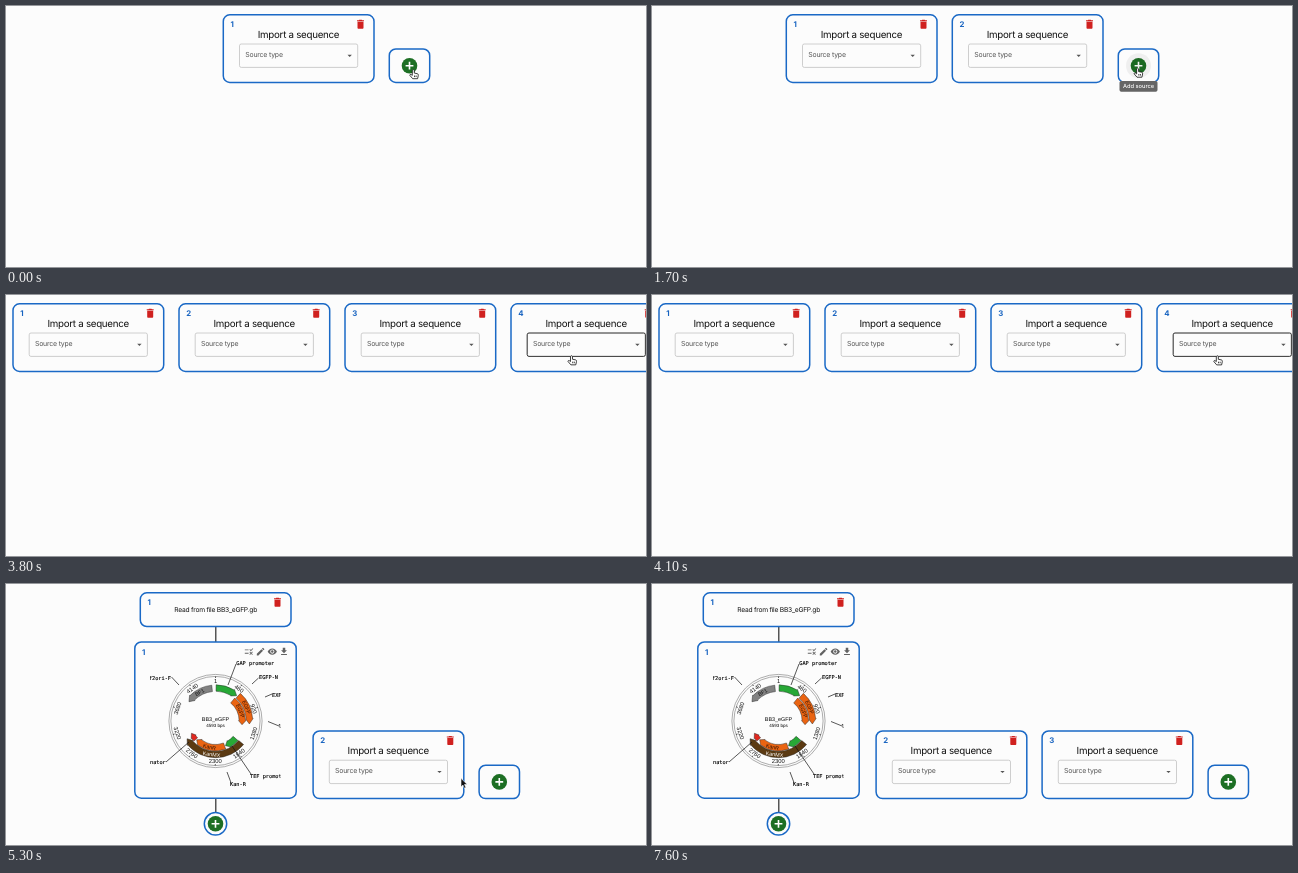
An HTML page for the animation above (8000 ms loop, 640x261 px).

```html
<!DOCTYPE html>
<html lang="en">
<head>
<meta charset="utf-8">
<title>Adding sources</title>
<style>
html, body { margin: 0; width: 100%; height: 100%; overflow: hidden; background: #fcfcfc; }
svg { display: block; width: 100%; height: 100%; }
text { font-family: "Liberation Sans", Arial, sans-serif; text-rendering: geometricPrecision; }
.box { fill: #fcfcfc; stroke: #1a69c6; stroke-width: 1.5; }
.num { font: bold 7.8px Inter, sans-serif; fill: #1763c0; }
.title { font: 9.75px Inter, sans-serif; letter-spacing: -.28px; fill: #111; text-anchor: middle; }
.field { fill: none; stroke: #c2c2c2; stroke-width: .8; }
.label { font: 6.95px Inter, sans-serif; letter-spacing: -.2px; fill: #555; }
.file { font: 6.7px Inter, sans-serif; letter-spacing: -.24px; fill: #111; text-anchor: middle; }
.mono { font: 5.25px "DejaVu Sans Mono", monospace; fill: #000; stroke: #000; stroke-width: .12; }
.mid { text-anchor: middle; }
.end { text-anchor: end; }
.name { font-size: 5.4px; text-anchor: middle; }
.size { font-size: 4.5px; text-anchor: middle; }
.link { stroke: #2b2b2b; stroke-width: 1.2; }
.lead { fill: none; stroke: #111; stroke-width: .7; }
.ring { fill: none; stroke: #8a8a8a; stroke-width: .7; }
.tip { font: 500 5.7px Inter, sans-serif; fill: #fff; text-anchor: middle; }
</style>
</head>
<body>
<svg id="stage" viewBox="0 0 640 261" preserveAspectRatio="none" xmlns="http://www.w3.org/2000/svg"></svg>
<script>
const LOOP = 8000, STEP = 100, PITCH = 166;
const TRASH = 'M6 19c0 1.1.9 2 2 2h8c1.1 0 2-.9 2-2V7H6v12zM19 4h-3.5l-1-1h-5l-1 1H5v2h14V4z';
const TOOLS = [
  [326, 'M16.5 11 13 7.5l1.4-1.4 2.1 2.1 4.3-4.3 1.4 1.4zM11 7H2v2h9zM21 13.4 19.6 12 17 14.6 14.4 12 13 13.4l2.6 2.6-2.6 2.6 1.4 1.4 2.6-2.6 2.6 2.6 1.4-1.4-2.6-2.6zM11 15H2v2h9z'],
  [337.6, 'M3 17.2V21h3.8L17.8 9.9l-3.7-3.7zM20.7 7a1 1 0 0 0 0-1.4l-2.3-2.3a1 1 0 0 0-1.4 0l-1.9 1.8 3.8 3.8z'],
  [349.3, 'M12 4.5C7 4.5 2.7 7.6 1 12c1.7 4.4 6 7.5 11 7.5s9.3-3.1 11-7.5c-1.7-4.4-6-7.5-11-7.5zM12 17a5 5 0 1 1 0-10 5 5 0 0 1 0 10zm0-8a3 3 0 1 0 0 6 3 3 0 0 0 0-6z'],
  [361, 'M5 20h14v-2H5zM19 9h-4V3H9v6H5l7 7z']
];

const text = (x, y, cls, s) => `<text x="${x}" y="${y}" class="${cls}">${s}</text>`;
const box = (x, y, w, h, r = 6.5) =>
  `<rect class="box" x="${x + .8}" y="${y + .8}" width="${w - 1.6}" height="${h - 1.6}" rx="${r}"/>`;
const icon = (cx, cy, k, fill, d) =>
  `<path transform="translate(${cx - 12 * k} ${cy - 12 * k}) scale(${k})" fill="${fill}" d="${d}"/>`;
const trash = (cx, cy) => icon(cx, cy, .5, '#d0211f', TRASH);
const line = (x1, y1, x2, y2, cls) => `<path class="${cls}" d="M${x1} ${y1}L${x2} ${y2}"/>`;
const plus = (x, y) => `<circle cx="${x}" cy="${y}" r="7.8" fill="#1d6f24"/>
  <path d="M${x - 3.9} ${y}h7.8M${x} ${y - 3.9}v7.8" stroke="#fff" stroke-width="1.6"/>`;

// Empty source card
const card = (x, y, n) => box(x, y, 152.3, 69.2) +
  text(x + 8, y + 12.6, 'num', n) + trash(x + 138, y + 10.2) +
  text(x + 76, y + 23.5, 'title', 'Import a sequence') +
  `<rect class="field" x="${x + 17}" y="${y + 30}" width="118.2" height="23.4" rx="1.8"/>` +
  text(x + 22.7, y + 43.2, 'label', 'Source type') +
  `<path d="M${x + 125} ${y + 40.7}h4.4l-2.2 2.2z" fill="#555"/>`;

const addBox = (x, y) => box(x, y + 34.2, 42, 35) + plus(x + 21, y + 51.7);

// Plasmid map, angles in degrees clockwise from the top
const CX = 292.5, CY = 137;
const polar = (r, a) => {
  const q = a * Math.PI / 180;
  return (CX + r * Math.sin(q)).toFixed(2) + ' ' + (CY - r * Math.cos(q)).toFixed(2);
};
function band(r, a, b, fill, w = 6.4, head = 9) {
  const cw = b > a ? 1 : 0, neck = b - (cw ? head : -head), o = r + w / 2, i = r - w / 2;
  const big = Math.abs(neck - a) > 180 ? 1 : 0;
  return `<path fill="${fill}" stroke="#222" stroke-width=".45" d="M${polar(o, a)}A${o} ${o} 0 ${big} ${cw} ${polar(o, neck)}
    L${polar(o + .6, neck)}L${polar(r, b)}L${polar(i - .6, neck)}L${polar(i, neck)}
    A${i} ${i} 0 ${big} ${1 - cw} ${polar(i, a)}Z"/>`;
}
function ringText(r, a, s, size, fill = '#222') {
  const turn = a > 90 && a < 270 ? a - 180 : a;
  return `<text transform="translate(${polar(r, a)}) rotate(${turn})" dy=".35em" class="mid" font-size="${size}" fill="${fill}">${s}</text>`;
}
function plasmid() {
  let s = `<circle class="ring" cx="${CX}" cy="${CY}" r="46.6"/><circle class="ring" cx="${CX}" cy="${CY}" r="44.6"/>`;
  for (let k = 0; k < 10; k++) {
    const bp = k * 460 || 1, a = bp / 4593 * 360;
    s += `<path class="lead" d="M${polar(44.6, a)}L${polar(43, a)}"/>` + ringText(40, a, bp, 5.8, '#111');
  }
  s += band(33, 1, 40, '#27a836') + band(34, 42, 95, '#ea6412') + band(26.8, 40, 98, '#ea6412') +
    band(32.8, -6, -54, '#828282') + band(33.5, 130, 238, '#5b3a12') +
    band(26.6, 131, 158, '#27a836') + band(26.6, 160, 225, '#ea6412') + band(27, 227, 243, '#e0281f', 5) +
    ringText(34, 66, 'EGFP', 5.2, '#2a1002') + ringText(26.8, 68, 'EGFP', 5.2, '#2a1002') +
    ringText(32.8, -29, 'BF1', 5.2, '#111') +
    ringText(33.5, 187, 'KanMX', 5.4, '#fff') + ringText(26.6, 193, 'KanR', 5.2, '#2a1002');
  s += text(CX, 137, 'name', 'BB3_eGFP') + text(CX, 143.2, 'size', '4593 bps');
  s += line(313, 80, 305, 101, 'lead') + text(313.3, 81, 'mono', 'GAP promoter') +
    line(335.5, 94, 329, 100, 'lead') + text(336, 95, 'mono', 'EGFP-N') +
    line(349, 110, 342, 113, 'lead') + text(349, 113, 'mono', 'EXF') +
    line(345, 137.5, 356, 142, 'lead') + text(355.5, 143.5, 'mono', 'l') +
    line(248.5, 93, 256, 101, 'lead') + text(248, 96, 'mono end', 'f2ori-F') +
    line(243, 178, 266, 158, 'lead') + text(242.8, 180, 'mono end', 'TEF terminator') +
    line(328, 190, 309, 162, 'lead') + text(327, 194, 'mono', 'TEF promoter') +
    line(308.5, 200, 304, 188, 'lead') + text(307, 202, 'mono', 'Kan-R');
  return s;
}
const fileGroup = dx => `<g transform="translate(${dx} 0)">` +
  line(292.8, 43, 292.8, 58, 'link') + line(292.8, 214, 292.8, 228, 'link') +
  box(216.5, 8, 152.3, 35.3) + text(224.5, 20.6, 'num', 1) + trash(354.5, 18.2) +
  text(292.7, 27.9, 'file', 'Read from file BB3_eGFP.gb') +
  box(211, 57.2, 163, 157.8) + text(219, 70.6, 'num', 1) +
  TOOLS.map(([x, d]) => icon(x, 67.6, .42, '#626262', d)).join('') +
  `<g clip-path="url(#map)">${plasmid()}</g>` +
  `<circle class="box" cx="292.5" cy="239.8" r="11.2"/>` + plus(292.5, 239.8) + '</g>';

// start, first card x, row y, cards, first number, file shift
const stages = [
  [0, 216.5, 8, 1, 1],
  [1100, 133.5, 8, 2, 1],
  [2200, 50.5, 8, 3, 1],
  [3700, 6.2, 8, 4, 1],
  [4200, 389.3, 146.2, 0, 2, 0],
  [4900, 306.3, 146.2, 1, 2, -83],
  [6100, 223.3, 146.2, 2, 2, -166]
].map(([at, x, y, n, first, dx]) => ({ at, x, y, n, first, dx, px: x + n * PITCH + 21, py: y + 51.7 }));

// time, x, y of the pointer tip; eased between rows
const path = [
  [0, 407.3, 63.5], [1200, 406, 62.5], [1550, 485.6, 62], [2450, 486, 62], [2800, 537, 54.3],
  [3050, 566, 60.5], [4199, 565.3, 60.7], [4200, 415.3, 197.6], [5050, 415.3, 197.6],
  [5300, 455, 194.3], [5550, 493, 198], [6300, 493, 198]
];
const HIDE = 6300;
const tips = [[250, 1100], [1550, 2200], [3050, 3700], [4300, 4900], [5600, 6100]];
const clicks = [900, 2000, 3500, 4700, 5900];

const drawStage = s => '<g class="scene">' + (s.dx === undefined ? '' : fileGroup(s.dx)) +
  Array.from({ length: s.n }, (_, i) => card(s.x + i * PITCH, s.y, s.first + i)).join('') +
  addBox(s.x + s.n * PITCH, s.y) + '</g>';

const svg = document.getElementById('stage');
svg.innerHTML = '<defs><clipPath id="map"><rect x="227" y="75" width="130.5" height="127.5"/></clipPath></defs>' +
  stages.map(drawStage).join('') +
  `<rect id="focus" width="118.2" height="23.4" rx="1.8" fill="none" stroke="#2a2a2a" stroke-width=".9"/>
  <circle id="halo" r="12.5" fill-opacity=".05"/><circle id="ripple" fill="#1d6f24"/>
  <g id="tip"><rect x="-19" y="15.2" width="38" height="10.8" rx="1.8" fill="#656565"/>${text(0, 22.7, 'tip', 'Add source')}</g>
  <path id="hand" fill="#fff" stroke="#111" stroke-width=".8" stroke-linejoin="round"
    d="M-1 .9Q0-.7 1 .9V3.6L4 4.2Q5.2 4.5 5 5.8L4.3 9.2H-.6L-3.5 5.8Q-3.4 4.5-2.2 5L-1 5.9ZM1.2 6v1.6M2.8 6v1.6"/>
  <path id="arrow" fill="#111" stroke="#fff" stroke-width=".6" d="M0 0V8.6L2 6.8 3.4 10 4.9 9.3 3.5 6.2H6.2Z"/>`;

const scenes = [...svg.querySelectorAll('.scene')];
const [focus, halo, ripple, tip, hand, arrow] =
  ['focus', 'halo', 'ripple', 'tip', 'hand', 'arrow'].map(id => document.getElementById(id));
const show = (node, on) => node.style.display = on ? '' : 'none';
const put = (node, x, y) => node.setAttribute('transform', `translate(${x} ${y})`);
const clamp = v => Math.max(0, Math.min(1, v));

function pointer(t) {
  const i = path.findIndex(p => p[0] > t);
  if (i < 0) return path[path.length - 1].slice(1);
  const a = path[i - 1], b = path[i], u = (t - a[0]) / (b[0] - a[0]), e = u * u * (3 - 2 * u);
  return [a[1] + (b[1] - a[1]) * e, a[2] + (b[2] - a[2]) * e];
}

function draw(t) {
  const cur = stages.filter(s => s.at <= t).pop();
  scenes.forEach((g, i) => show(g, stages[i] === cur));

  const [x, y] = pointer(t), seen = t < HIDE;
  const onPlus = seen && Math.hypot(x - cur.px, y - cur.py) < 12;
  const col = Math.floor((x - cur.x) / PITCH), fx = cur.x + col * PITCH + 17, fy = cur.y + 30;
  const onField = seen && col >= 0 && col < cur.n && x > fx && x < fx + 118 && y > fy && y < fy + 24;

  show(focus, onField);
  put(focus, fx, fy);
  show(halo, onPlus && t > 0);
  put(halo, cur.px, cur.py);
  show(hand, seen && (onPlus || onField));
  show(arrow, seen && !onPlus && !onField);
  put(hand, x, y);
  put(arrow, x, y);

  const hit = clicks.find(c => t >= c && t < c + 200), u = hit === undefined ? 0 : (t - hit + 100) / 300;
  show(ripple, u > 0);
  put(ripple, cur.px, cur.py);
  ripple.setAttribute('r', 12.5 * u);
  ripple.setAttribute('fill-opacity', .2 * (1 - u / 2));

  const span = tips.find(([a, b]) => t >= a && t < b);
  show(tip, span);
  put(tip, cur.px, cur.py);
  if (span) tip.setAttribute('opacity', clamp((t - span[0] + 50) / 150));
}

const start = performance.now();
function tick() {
  const t = (performance.now() - start) % LOOP;
  draw(Math.floor(t / STEP) * STEP);
  requestAnimationFrame(tick);
}
tick();
</script>
</body>
</html>
```
